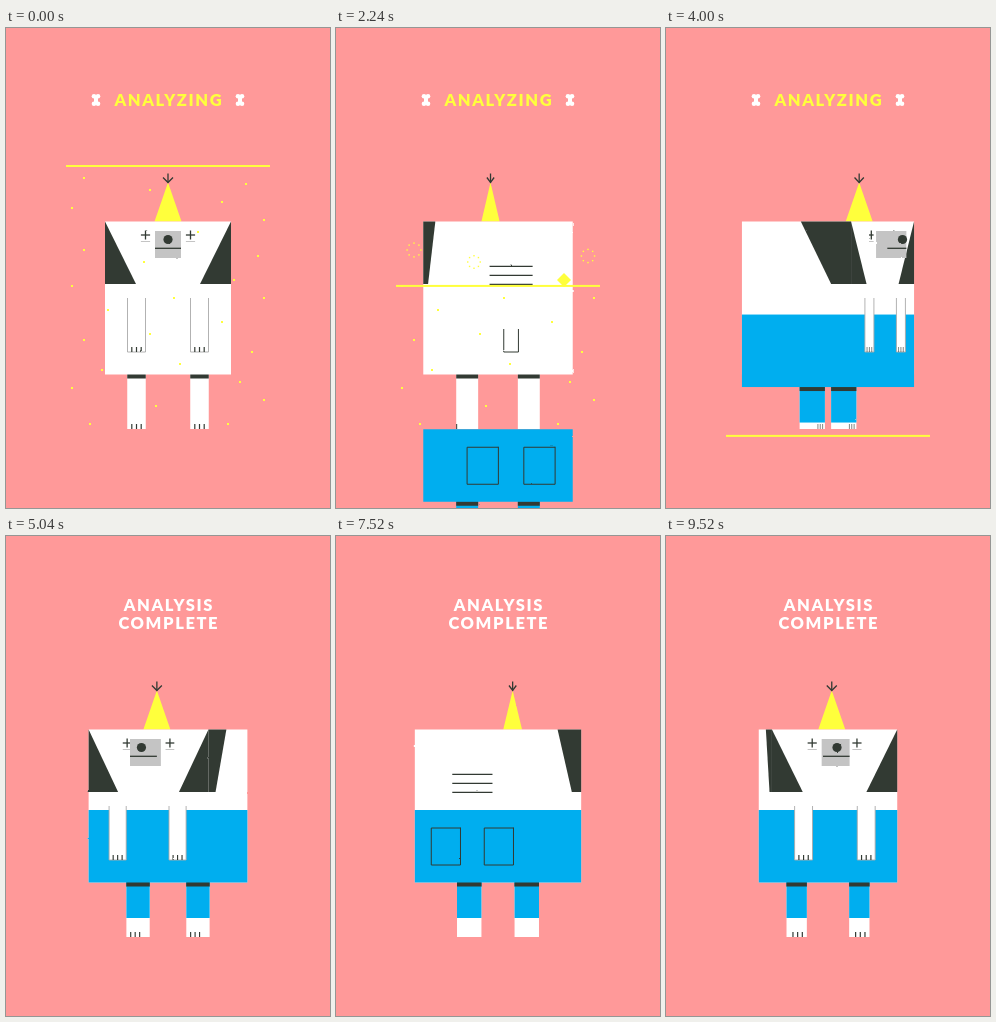
Animation, 324 px wide and 480 px high, one loop 9.6 s. Source, as an HTML page with a canvas:

```html
<!DOCTYPE html>
<html lang="en">
<head>
<meta charset="utf-8">
<title>Analyzing</title>
<style>
html, body { margin: 0; width: 100%; height: 100%; overflow: hidden; background: #f99; }
canvas { position: absolute; left: 0; top: 0; }
#dog { filter: url(#rough); }
svg { position: absolute; }
</style>
</head>
<body>
<svg width="0" height="0">
  <filter id="rough" x="0" y="0" width="1" height="1" color-interpolation-filters="sRGB">
    <feTurbulence type="fractalNoise" baseFrequency=".15" numOctaves="2" seed="4"/>
    <feDisplacementMap in="SourceGraphic" scale="1.6" xChannelSelector="R" yChannelSelector="G"/>
  </filter>
</svg>
<canvas id="dog" width="324" height="480"></canvas>
<canvas id="fx" width="324" height="480"></canvas>
<script>
const dog = document.getElementById('dog').getContext('2d');
const fx = document.getElementById('fx').getContext('2d');
const DARK = '#323a33', BLUE = '#00aeef', GREY = '#c4c4c4', YELLOW = '#ffff3c', WHITE = '#fff';
const LOOP = 9600, HALF = 4800, STEP = 80, MID = 162;
const TOP = 193.5, BOTTOM = 346.5, R = 63;

// Dots that the scan line pops, as x, y pairs on a grid of 6 px
const DOTS = [13,25, 40,26, 24,27, 36,29, 11,30, 43,32, 32,34, 13,37, 42,38, 23,39, 38,42, 11,43, 43,45,
  28,45, 17,47, 36,49, 24,51, 13,52, 41,54, 29,56, 16,57, 39,59, 11,60, 43,62, 25,63, 14,66, 37,66];

let cos, sin;
// Screen x of a point at u (sideways) and z (forward) on the turning dog
const X = (u, z) => MID + u * cos - z * sin;
const clamp = p => Math.max(0, Math.min(1, p));
const smooth = p => (p = clamp(p), p * p * (3 - 2 * p));
const scanY = t => 138 + 270 * smooth((t - 690) / 3350);

function rect(g, color, x0, y0, x1, y1) {
  g.fillStyle = color;
  g.fillRect(Math.min(x0, x1), y0, Math.abs(x1 - x0), y1 - y0);
}

function poly(g, color, points) {
  g.fillStyle = color;
  g.beginPath();
  points.forEach(p => g.lineTo(...p));
  g.fill();
}

function line(g, color, width, ...points) {
  g.strokeStyle = color;
  g.lineWidth = width;
  g.beginPath();
  points.forEach((p, i) => i ? g.lineTo(...p) : g.moveTo(...p));
  g.stroke();
}

function disc(g, color, x, y, r) {
  g.fillStyle = color;
  g.beginPath();
  g.arc(x, y, r, 0, 7);
  g.fill();
}

function legs(y0, y1, color) {
  const half = 9.25 * (Math.abs(cos) + Math.abs(sin));
  for (const u of [-31.5, 31.5]) {
    const x = X(u, 0);
    rect(dog, color, x - half, y0, x + half, y1);
  }
  for (const u of [-31.5, 31.5]) {
    const x = X(u, 0);
    rect(dog, DARK, x - half, y0, x + half, y0 + 4.5);
  }
}

function block(color, y0, y1) {
  const half = R * (Math.abs(cos) + Math.abs(sin));
  rect(dog, color, MID - half, y0, MID + half, y1);
}

function claws(u, z, y) {
  for (const d of [-4.7, 0, 4.7]) line(dog, DARK, Math.max(.5, 1.2 * cos), [X(u + d, z), y - 5], [X(u + d, z), y]);
}

function snout() {
  const xs = [X(-13, R), X(13, R), X(-13, 83), X(13, 83)];
  rect(dog, GREY, Math.min(...xs), 203, Math.max(...xs), 230);
  const mouth = [X(-13, 83), X(13, 83), X(sin > 0 ? 13 : -13, 76)];
  line(dog, DARK, 1.3, [Math.min(...mouth), 220.3], [Math.max(...mouth), 220.3]);
  disc(dog, DARK, X(0, 86), 211.5, 4.6);
}

function hat() {
  const x = X(0, 36), half = 13.5 + 4.5 * Math.min(0, cos), arm = 4.3 + .7 * cos;
  poly(dog, YELLOW, [[x, 154.5], [x + half, TOP], [x - half, TOP]]);
  line(dog, DARK, 1.3, [x, 145.5], [x, 154.5]);
  line(dog, DARK, 1.3, [x - arm, 149.5], [x, 154.5], [x + arm, 149.5]);
}

function patches() {
  for (const s of [-1, 1]) {
    const corner = X(s * R, R);
    if (cos > 0) poly(dog, DARK, [[corner, TOP], [X(s * 32, R), 256], [corner, 256]]);
    if (s * sin > 0) poly(dog, DARK, [[corner, TOP], [X(s * R, 5), TOP], [X(s * R, 40), 256], [corner, 256]]);
  }
}

function back() {
  for (const y of [238.3, 247.3, 256.3]) line(dog, DARK, 1.2, [X(-22, -R), y], [X(22, -R), y]);
  const a = X(-7.5, -R), b = X(7.5, -R);
  line(dog, DARK, 1, [a, 301], [a, 324], [b, 324], [b, 301]);
}

function pants(top) {
  legs(top + 72, top + 108, BLUE);
  block(BLUE, top, top + 72.5);
  if (cos >= 0) return;
  for (const u of [-29, 29]) {
    const a = X(u - 16, -R), b = X(u + 16, -R);
    line(dog, DARK, 1, [a, top + 18], [b, top + 18], [b, top + 55], [a, top + 55], [a, top + 17.5]);
  }
}

function face() {
  for (const u of [-22.5, 22.5]) {
    const x = X(u, R), w = 4.6 * cos;
    line(dog, DARK, 1.3, [x - w, 207], [x + w, 207]);
    line(dog, DARK, 1.3, [x, 202.5], [x, 211.5]);
    line(dog, GREY, 1, [x - w, 213.5], [x + w, 213.5]);
  }
  snout();
}

function arms() {
  for (const u of [-31.5, 31.5]) {
    const a = X(u - 9, 66), b = X(u + 9, 66);
    rect(dog, WHITE, a, 270, b, 324);
    line(dog, '#aaa', .9, [a, 270], [a, 324], [b, 324], [b, 270]);
    claws(u, 66, 324);
  }
}

function drawDog(t) {
  dog.clearRect(0, 0, 324, 480);
  hat();
  if (cos < 0) snout();
  legs(346, 401, WHITE);
  block(WHITE, TOP, BOTTOM);
  patches();
  if (cos < 0) back();
  pants(516 - 242 * smooth(t / 4640));
  if (t > 3600 && cos > 0 || t < 1200) for (const u of [-31.5, 31.5]) claws(u, 9.25, 401);
  else if (t >= HALF && cos > 0) for (const u of [-31.5, 31.5]) claws(u, 9.25, 401);
  const side = Math.sign(sin);
  if (cos < 0 && sin > 0 && (t < 2400 || t > HALF)) line(dog, DARK, 1, [X(side * 40.75, 7), 396], [X(side * 40.75, 7), 401]);
  if (cos > 0) {
    face();
    arms();
  }
}

// A dot becomes a diamond, a four-ray star and a ring once the line has passed it
function burst(x, y, age) {
  if (age < 0) rect(fx, YELLOW, x - 1, y - 1, x + 1, y + 1);
  else if (age < 80) poly(fx, YELLOW, [[x, y - 7], [x + 7, y], [x, y + 7], [x - 7, y]]);
  else if (age < 200) {
    for (const [dx, dy] of [[0, 1], [1, 0], [0, -1], [-1, 0]])
      line(fx, YELLOW, 1.8, [x + dx * 2, y + dy * 2], [x + dx * 7, y + dy * 7]);
  } else if (age < 328) {
    const r = 5 + age / 160;
    for (let a = 0; a < 8; a++) {
      const px = x + r * Math.cos(a * Math.PI / 4), py = y + r * Math.sin(a * Math.PI / 4);
      rect(fx, YELLOW, px - .7, py - .7, px + .7, py + .7);
    }
  }
}

// Time at which the scan line reaches a height, by bisection
function passTime(y) {
  let a = 690, b = 4040;
  for (let i = 0; i < 20; i++) {
    const m = (a + b) / 2;
    if (scanY(m) < y) a = m; else b = m;
  }
  return a;
}
const dots = [];
for (let i = 0; i < DOTS.length; i += 2) dots.push({ x: DOTS[i] * 6, y: DOTS[i + 1] * 6, at: passTime(DOTS[i + 1] * 6) });

function bone(x, y, turned) {
  fx.save();
  fx.translate(x, y);
  if (turned) fx.rotate(Math.PI / 2);
  rect(fx, WHITE, -2, -4, 2, 4);
  for (const sx of [-1, 1]) for (const sy of [-1, 1]) disc(fx, WHITE, sx * 2, sy * 3.8, 2.3);
  fx.restore();
}

function title(text, color, baseline) {
  fx.font = '900 16.5px Lato, sans-serif';
  fx.letterSpacing = '1.6px';
  fx.textAlign = 'center';
  fx.fillStyle = color;
  fx.fillText(text, MID + .8, baseline);
}

function drawScan(t) {
  fx.clearRect(0, 0, 324, 480);
  if (t >= HALF) {
    title('ANALYSIS', WHITE, 75);
    title('COMPLETE', WHITE, 93);
    return;
  }
  title('ANALYZING', YELLOW, 78);
  const turned = Math.floor(t / 480) % 2;
  bone(90, 72, turned);
  bone(234, 72, turned);
  const y = scanY(t);
  rect(fx, YELLOW, 60, y - 1, 264, y + 1);
  for (const d of dots) burst(d.x, d.y, t - d.at);
}

const start = performance.now();
function frame() {
  const t = Math.floor((performance.now() - start) % LOOP / STEP) * STEP;
  const angle = t / HALF * 2 * Math.PI;
  cos = Math.cos(angle);
  sin = Math.sin(angle);
  drawDog(t);
  drawScan(t);
  requestAnimationFrame(frame);
}
frame();
</script>
</body>
</html>
```
